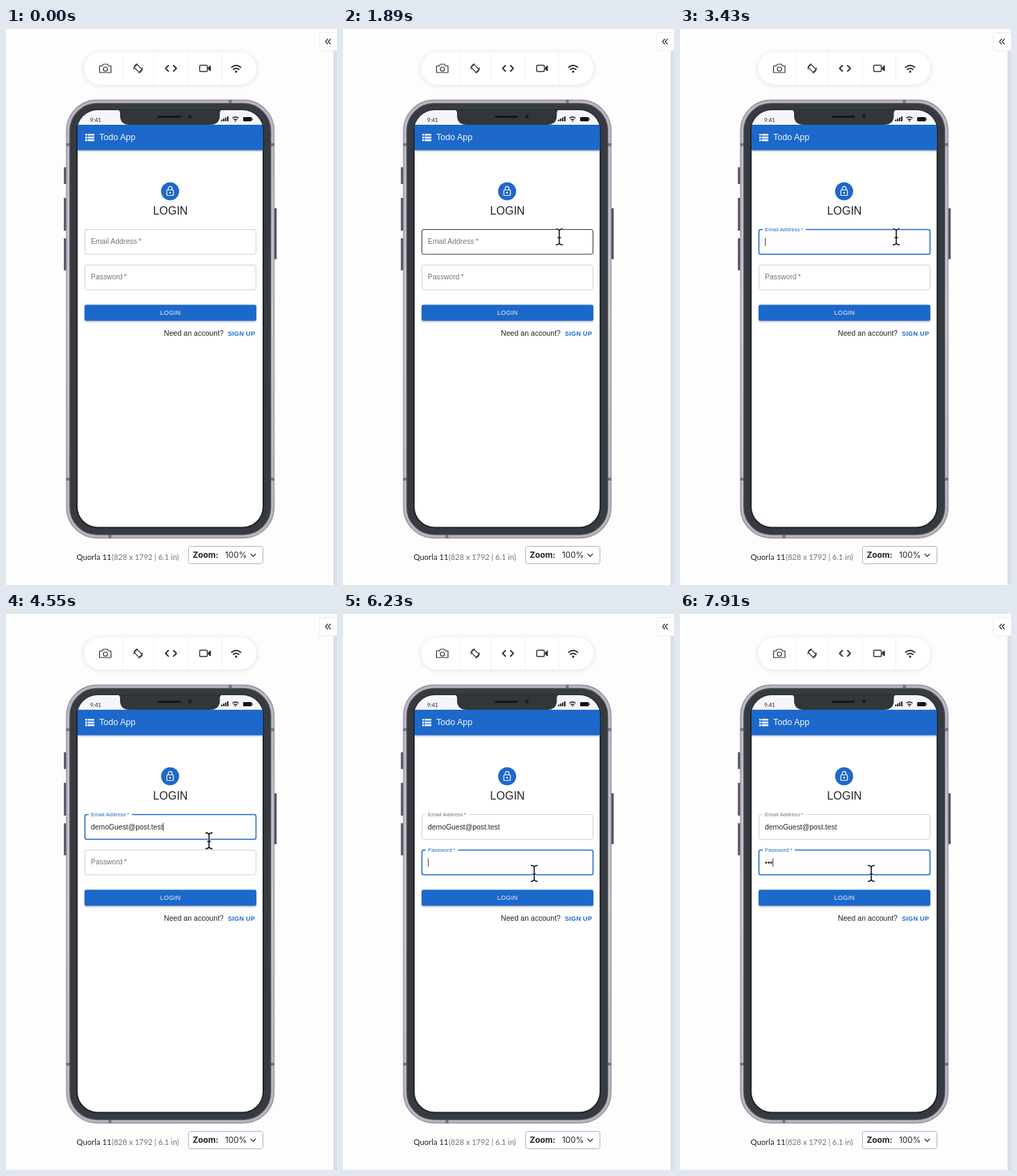
An HTML page that plays this animation: 476x800 px, repeating every 8 s.

```html
<!DOCTYPE html>
<html lang="en">
<head>
<meta charset="utf-8">
<title>Login form demo</title>
<style>
  html, body { margin: 0; width: 100%; height: 100%; overflow: hidden; background: #fdfdfd; }
  svg { display: block; width: 476px; height: 800px; }
  text { font-family: "Liberation Sans", Arial, sans-serif; white-space: pre; }
  .lato { font-family: Lato, sans-serif; }
  .inter { font-family: Inter, sans-serif; }
  .icon { fill: none; stroke: #2d2d35; stroke-width: 1.2; stroke-linecap: round; stroke-linejoin: round; }
  .button { font-size: 9.1px; letter-spacing: .26px; }
  .input { font-size: 10.4px; }
</style>
</head>
<body>
<svg viewBox="0 0 476 800">
  <defs>
    <linearGradient id="metal" x2="0" y2="1">
      <stop stop-color="#bab4c2"/><stop offset=".5" stop-color="#cdc7cf"/><stop offset="1" stop-color="#b9b3be"/>
    </linearGradient>
    <filter id="shadow" x="-10%" y="-30%" width="120%" height="180%">
      <feDropShadow dx="0" dy="1.2" stdDeviation="1.2" flood-color="#404050" flood-opacity=".45"/>
    </filter>
    <filter id="glow" x="-10%" y="-30%" width="120%" height="160%">
      <feDropShadow dx="0" dy="1" stdDeviation="3" flood-color="#b8b8e0" flood-opacity=".4"/>
    </filter>
    <clipPath id="screen"><rect x="102" y="118" width="268" height="599.5" rx="30"/></clipPath>
    <path id="beam" d="M-5-11.500q4 0 5 2.500 1-2.500 5-2.500M0-9V9M-5 11.500q4 0 5-2.500 1 2.500 5 2.500M-2.500 1h5"/>
  </defs>

  <!-- page edges -->
  <path d="M0 .5H476" stroke="#dedee2"/>
  <path d="M473.5 33V800" stroke="#dcdcec" stroke-width="5"/>
  <rect x="450.5" y="6.5" width="28" height="26" rx="3" fill="#fff" stroke="#ececf2"/>
  <path class="icon" d="M462.5 16l-3 3.5 3 3.5M466.5 16l-3 3.5 3 3.5"/>

  <!-- toolbar -->
  <rect x="112" y="34.5" width="248.5" height="47" rx="23.5" fill="#fff" stroke="#f1f1f8" filter="url(#glow)"/>
  <path d="M167.5 35V81M212.5 35V81M262.5 35V81M310.5 35V81" stroke="#efeff6"/>
  <g class="icon">
    <path d="M134.5 54.5h4l1.5-2.5h6l1.5 2.5h3.500v9.500h-16.500z"/>
    <circle cx="143" cy="59" r="3"/>
    <rect x="187" y="53" width="6" height="10" rx="1" transform="rotate(-45 190 58)"/>
    <path d="M184 59a6.500 6.500 0 0 1 5-7.300M196 57a6.500 6.500 0 0 1-5 7.300"/>
    <path d="M233.5 54l-4 4 4 4M241 54l4 4-4 4" stroke-width="1.8"/>
    <rect x="278.5" y="53.5" width="11" height="9" rx="1.5" stroke-width="1.4"/>
    <path d="M291 57l3-2.500v7l-3-2.500z" fill="#2d2d35"/>
    <path d="M324.5 56.5q6.500-5.500 13 0M327 59.500q4-3.200 8 0" stroke-width="1.9"/>
    <circle cx="331" cy="62.700" r="1" fill="#2d2d35"/>
  </g>

  <!-- phone -->
  <path d="M85 200V224M85 244V291M85 302V348M387.5 259V332" stroke="#53525f" stroke-width="3.5"/>
  <rect x="87" y="103.5" width="298.5" height="629" rx="44" fill="url(#metal)" stroke="#96909f" stroke-width="1.3"/>
  <path d="M86.5 167.500h6M380 167.500h6M86.5 648h6M380 648h6M322.5 103v5M149.5 728v5" stroke="#77717f" stroke-width="4"/>
  <rect x="92" y="108.5" width="288.5" height="619" rx="39" fill="#353b40" stroke="#454a50" stroke-width="1.5"/>
  <rect x="102" y="118" width="268" height="599.5" rx="30" fill="#fff" stroke="#202428" stroke-width="2"/>
  <g clip-path="url(#screen)">
    <rect x="102" y="118" width="268" height="21" fill="#f6f5fa"/>
    <rect x="103" y="139" width="266.5" height="36.5" fill="#1f68cb" filter="url(#shadow)"/>
  </g>
  <path d="M161 117.500q3 1 3 5v3q0 13.500 14 13.500h115q14.500 0 14.500-13.500v-3q0-4 3-5z" fill="#31363b"/>
  <path d="M220 127.500h30" stroke="#131518" stroke-width="3" stroke-linecap="round"/>
  <circle cx="264.5" cy="127" r="2.5" fill="#171c24"/>

  <!-- status bar -->
  <text class="lato" x="121" y="134.5" font-size="8" fill="#222">9:41</text>
  <path d="M310.3 134v-2.500M313.2 134v-4M316.1 134v-5.500M319 134v-7" stroke="#222" stroke-width="2"/>
  <path d="M325.5 129.500q4.500-3.500 9 0M327.5 131.800q2.500-1.800 5 0" fill="none" stroke="#222" stroke-width="1.5"/>
  <circle cx="330" cy="133.5" r="1" fill="#222"/>
  <rect x="341" y="128" width="12.5" height="6" rx="1.3" fill="#111"/>
  <path d="M354.5 130v2" stroke="#333"/>

  <!-- app -->
  <path d="M114 153.300h2.500M114 157.200h2.500M114 161.100h2.500M117.5 153.300h9.500M117.5 157.200h9.500M117.5 161.100h9.500" stroke="#fff" stroke-width="2.6"/>
  <text x="134" y="161" font-size="12.5" fill="#f4f7fc">Todo App</text>
  <circle cx="236" cy="234.5" r="13" fill="#1f68cb"/>
  <g fill="none" stroke="#fff" stroke-width="1.2">
    <rect x="231.3" y="232.5" width="9.4" height="8" rx="1"/>
    <path d="M233.3 232.500v-2.200a2.700 2.700 0 0 1 5.400 0v2.200"/>
    <circle cx="236" cy="236.5" r=".7" fill="#fff"/>
  </g>
  <text x="236.5" y="268.3" font-size="16" text-anchor="middle" fill="#222">LOGIN</text>
  <g id="fields"></g>
  <rect x="113" y="397.5" width="247" height="23" rx="2.5" fill="#1f68cb" filter="url(#shadow)"/>
  <text class="button" x="236.6" y="412" text-anchor="middle" fill="#f1f5fc">LOGIN</text>
  <text x="227" y="442" font-size="10.6" fill="#222">Need an account?</text>
  <text class="button" x="319" y="441.5" font-weight="bold" fill="#1f68cb">SIGN UP</text>

  <!-- caption -->
  <text class="lato" x="151.5" y="764" font-size="11.3" text-anchor="end" fill="#222">Quorla 11</text>
  <text class="lato" x="152" y="764" font-size="11" fill="#74747a">(828 x 1792 | 6.1 in)</text>
  <rect x="262.5" y="744.5" width="107" height="25" rx="3" fill="#fff" stroke="#b0b0c4"/>
  <text class="inter" x="268.5" y="761" font-size="11.8" font-weight="bold" fill="#222">Zoom:</text>
  <text class="inter" x="315" y="761" font-size="11.8" fill="#222">100%</text>
  <path class="icon" d="M352 755.500l3.500 3.500 3.500-3.500"/>

  <g id="pointer" fill="none">
    <use href="#beam" stroke="#fff" stroke-width="3"/>
    <use href="#beam" stroke="#151518" stroke-width="1.6"/>
  </g>
</svg>
<script>
const LOOP = 8000, BLINK = 1060;
const BLUE = '#1f68cb', GREY = '#747478', HOVER = '#303036', IDLE = '#d0d0d6';
const pointer = document.getElementById('pointer');

// Pointer keys: time, x, y
const path = [
  [870, 338, 420], [1190, 320, 379], [1650, 311, 300], [4300, 311, 300],
  [4550, 292, 327], [4880, 275, 374], [LOOP, 275, 374]
];

const clamp = v => Math.max(0, Math.min(1, v));
const easeOut = v => 1 - (1 - clamp(v)) ** 3;

function makeField(options) {
  const group = document.createElementNS('http://www.w3.org/2000/svg', 'g');
  const top = options.top;
  group.innerHTML = `
    <rect x="113.5" y="${top}" width="246" height="35.5" rx="2.5" fill="none"/>
    <rect x="119" y="${top - 2}" height="4" fill="#fff"/>
    <text class="input">${options.label}\u2009*</text>
    <text class="input" x="122" y="${top + 21}" fill="#26262a"></text>
    <path stroke="#333"/>`;
  document.getElementById('fields').append(group);
  const [border, gap, label, value, caret] = group.children;
  return { ...options, border, gap, label, value, caret };
}

const fields = [
  makeField({ label: 'Email Address', top: 289.5, text: 'demoGuest@post.test',
    focus: 2100, blur: 5000, typeStart: 3520, typeEnd: 4250 }),
  makeField({ label: 'Password', top: 340.5, text: '•••',
    focus: 5000, blur: Infinity, typeStart: 6900, typeEnd: 7650 })
];

function pointerAt(t) {
  const i = path.findIndex(key => key[0] > t);
  if (i < 1) return null;
  const [a, b] = [path[i - 1], path[i]];
  const k = (t - a[0]) / (b[0] - a[0]);
  return { x: a[1] + (b[1] - a[1]) * k, y: a[2] + (b[2] - a[2]) * k };
}

function drawField(f, t, mouse) {
  const focused = t >= f.focus && t < f.blur;
  const hovered = mouse && mouse.y > f.top - 3 && mouse.y < f.top + 39.5;
  const lift = easeOut((t - f.focus) / 200);

  f.border.setAttribute('stroke', focused ? BLUE : hovered ? HOVER : IDLE);
  f.border.setAttribute('stroke-width', focused ? 1.5 : 1);
  f.label.setAttribute('fill', focused ? BLUE : GREY);
  f.label.setAttribute('transform',
    `translate(122 ${f.top + 20.5 - 18.5 * lift}) scale(${1 - .24 * lift})`);
  f.gap.setAttribute('width', (f.label.getComputedTextLength() * .76 + 7) * lift);

  const typed = clamp((t - f.typeStart) / (f.typeEnd - f.typeStart));
  const count = t < f.typeStart ? 0 : 1 + Math.floor(typed * (f.text.length - 1));
  f.value.textContent = f.text.slice(0, count);

  const typing = t >= f.typeStart && t < f.typeEnd;
  const since = t - (t >= f.typeEnd ? f.typeEnd : f.focus);
  const lit = focused && (typing || since % BLINK < BLINK / 2);
  const x = 122.7 + (count ? f.value.getComputedTextLength() : 0);
  f.caret.setAttribute('d', `M${x} ${f.top + 12}v11.5`);
  f.caret.setAttribute('visibility', lit ? 'visible' : 'hidden');
}

function draw(now) {
  const t = now % LOOP;
  const mouse = pointerAt(t);
  pointer.setAttribute('visibility', mouse ? 'visible' : 'hidden');
  if (mouse) pointer.setAttribute('transform', `translate(${mouse.x} ${mouse.y})`);
  fields.forEach(f => drawField(f, t, mouse));
  requestAnimationFrame(() => draw(performance.now() - start));
}

const start = performance.now();
draw(0);
</script>
</body>
</html>
```
